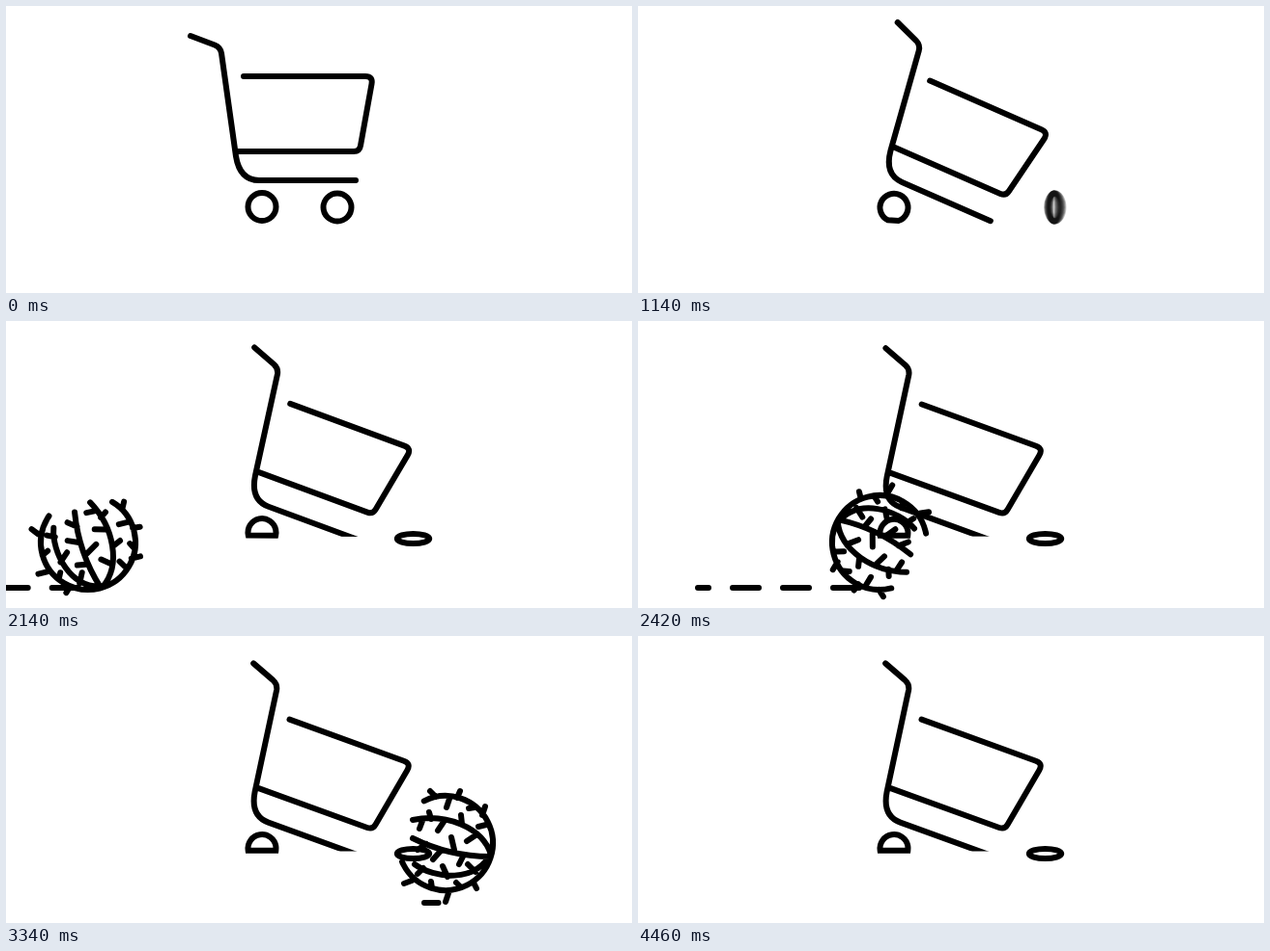
Animation, 648 px wide and 298 px high, one loop 8000 ms. Source, as an HTML page with a canvas:

```html
<!DOCTYPE html>
<html lang="en">
<head>
<meta charset="utf-8">
<title>Broken cart</title>
<style>
  html, body { margin: 0; width: 100%; height: 100%; overflow: hidden; background: #fff; }
  canvas { display: block; }
</style>
</head>
<body>
<canvas id="stage" width="648" height="298"></canvas>
<script>
const ctx = document.getElementById('stage').getContext('2d');
const LOOP = 8000, START = 500, STEP = 40, END = 4460;
const RAD = Math.PI / 180;
const AXLE = { x: 265, y: 208.5, r: 14.5 };
const REST_TILT = 20;

const clamp = v => Math.max(0, Math.min(1, v));
const lerp = (a, b, p) => a + (b - a) * p;

// Smooth curve through [time, value] keys without overshoot.
function track(keys) {
  const slope = i => (keys[i + 1][1] - keys[i][1]) / (keys[i + 1][0] - keys[i][0]);
  const tangents = keys.map((_, i) => {
    if (i === 0) return slope(0);
    if (i === keys.length - 1) return slope(i - 1);
    const a = slope(i - 1), b = slope(i);
    return a * b <= 0 ? 0 : 2 * a * b / (a + b);
  });
  return t => {
    if (t <= keys[0][0]) return keys[0][1];
    const i = keys.findIndex(k => k[0] >= t) - 1;
    if (i < 0) return keys[keys.length - 1][1];
    const [t0, v0] = keys[i], [t1, v1] = keys[i + 1];
    const h = t1 - t0, p = (t - t0) / h, q = 1 - p;
    return v0 * (1 + 2 * p) * q * q + tangents[i] * h * p * q * q
      + v1 * p * p * (3 - 2 * p) - tangents[i + 1] * h * p * p * q;
  };
}

const coinX = track([[500, 343], [640, 376], [800, 428], [960, 446], [1140, 431], [1300, 421.5]]);
const weedX = track([[1860, -90], [2140, 85], [2420, 250], [2980, 407], [3340, 455],
  [3820, 483], [4100, 490], [4220, 510], [4320, 570], [4420, 670], [4460, 720]]);
const weedY = track([[1860, 230], [2420, 230], [3020, 219], [3340, 215],
  [4100, 211], [4300, 190], [4420, 150], [4460, 140]]);
const trailTail = track([[1860, -90], [2180, -20], [2420, 62], [3020, 355],
  [3340, 433], [4100, 454], [4300, 510], [4460, 720]]);

const cartPath = new Path2D(
  'M191 31 L216 40.5 Q222 43 223 49 L238 156 Q242 181 262 181 H362 ' +
  'M246 73 H372 Q380 73 378.5 81 L367 145 Q366 151 360 151 H239');

const weedPath = new Path2D(
  'M-34 -24 C0 -31 38 -17 47 12 M-34 -5 Q4 14 46 14 M-32 22 C-12 37 32 42 47 10');
weedPath.moveTo(49 * Math.cos(-117 * RAD), 49 * Math.sin(-117 * RAD));
weedPath.arc(0, 0, 49, -117 * RAD, 156.5 * RAD);
[
  [-16, -54, -10, -48], [15, -54, 12, -47], [41, -38, 38, -29], [34, -17, 42, -19],
  [4, -46, 1, -37], [24, -36, 30, -37], [-17, -32, -15, -25], [-24, -23, -27, -15],
  [-2, -22, -8, -13], [16, -29, 17, -20], [22, -2, 31, -8], [-29, 7, -20, 1],
  [-13, 17, -5, 8], [6, -6, 9, 7], [14, 22, 18, 14], [-3, 24, 2, 35],
  [-23, 26, -29, 32], [-15, 40, -14, 47], [-43, 42, -35, 39], [11, 41, 16, 46],
  [23, 22, 31, 30], [32, 47, 29, 41], [0, 61, 3, 52]
].forEach(([x1, y1, x2, y2]) => {
  weedPath.moveTo(x1, y1);
  weedPath.lineTo(x2, y2);
});

const sinkAt = t => 1 - (1 - clamp((t - 1100) / 1800)) ** 3;

function tiltAt(t) {
  const fall = clamp((t - 560) / 260);
  const hop = Math.sin(Math.PI * clamp((t - 820) / 150)) * 2.5
    + Math.sin(Math.PI * clamp((t - 970) / 90)) * 0.8;
  return 24 * fall * fall - hop - 4 * sinkAt(t);
}

function drawCart(t) {
  const tilt = tiltAt(t);
  ctx.save();
  if (t > 1100) {
    ctx.translate(AXLE.x, 223.5);
    ctx.rotate((tilt - REST_TILT) * RAD);
    ctx.beginPath();
    ctx.rect(-300, -300, 700, 300);
    ctx.clip();
    ctx.rotate((REST_TILT - tilt) * RAD);
    ctx.translate(-AXLE.x, -223.5);
  }
  ctx.translate(AXLE.x, AXLE.y + 12 * sinkAt(t));
  ctx.rotate(tilt * RAD);
  ctx.translate(-AXLE.x, -AXLE.y);
  ctx.stroke(cartPath);
  ctx.restore();
}

function drawRearWheel(t) {
  const sink = sinkAt(t), y = AXLE.y + 12 * sink;
  ctx.save();
  ctx.translate(AXLE.x, y);
  ctx.beginPath();
  if (sink === 0) {
    ctx.arc(0, 0, AXLE.r, 0, 2 * Math.PI);
  } else {
    const half = Math.acos(Math.min(1, (222.7 - y) / AXLE.r));
    ctx.rotate((tiltAt(t) - REST_TILT) * RAD);
    ctx.lineJoin = 'miter';
    ctx.arc(0, 0, AXLE.r, Math.PI / 2 + half, Math.PI / 2 - half + 2 * Math.PI);
    ctx.closePath();
  }
  ctx.stroke();
  ctx.restore();
}

function strokeCoin(t) {
  const spin = Math.max(0, t - 800) * 0.02185;
  const flat = clamp((t - 1160) / 130) ** 2;
  const rx = lerp(AXLE.r * Math.abs(Math.cos(spin)), 16.7, flat);
  const ry = lerp(AXLE.r, 5, flat);
  ctx.beginPath();
  ctx.ellipse(coinX(t), lerp(209, 226, flat), rx, ry, 0, 0, 2 * Math.PI);
  ctx.stroke();
}

function drawCoin(t) {
  if (t < 800 || t >= 1180) return strokeCoin(t);
  // Motion blur while the wheel spins.
  ctx.save();
  ctx.globalAlpha = 0.22;
  for (let i = 0; i < 10; i++) strokeCoin(t + (i - 4.5) * 2.2);
  ctx.restore();
}

function drawTrail(t) {
  const head = weedX(t), tail = trailTail(t);
  const period = 52, dash = 27;
  const phase = 46 + 0.305 * (head - 250);
  const first = Math.floor((tail - phase) / period);
  ctx.beginPath();
  for (let x = phase + first * period; x < head; x += period) {
    const a = Math.max(x, tail), b = Math.min(x + dash, head);
    if (b < a) continue;
    ctx.moveTo(a, 277);
    ctx.lineTo(b + 0.01, 277);
  }
  ctx.stroke();
}

function drawWeed(t) {
  const x = weedX(t);
  ctx.save();
  ctx.translate(x, weedY(t));
  ctx.rotate(0.817 * (x - 455) * RAD);
  ctx.stroke(weedPath);
  ctx.restore();
}

function draw(now) {
  const time = now % LOOP;
  const t = time < START ? 0 : START + Math.floor((time - START) / STEP) * STEP;
  ctx.fillStyle = '#fff';
  ctx.fillRect(0, 0, 648, 298);
  ctx.strokeStyle = '#000';
  ctx.lineWidth = 6;
  ctx.lineCap = ctx.lineJoin = 'round';
  drawCart(t);
  drawRearWheel(t);
  drawCoin(t);
  if (t > 1860 && t < END) {
    drawTrail(t);
    drawWeed(t);
  }
}

const begin = performance.now();
function loop() {
  draw(performance.now() - begin);
  requestAnimationFrame(loop);
}
loop();
</script>
</body>
</html>
```
